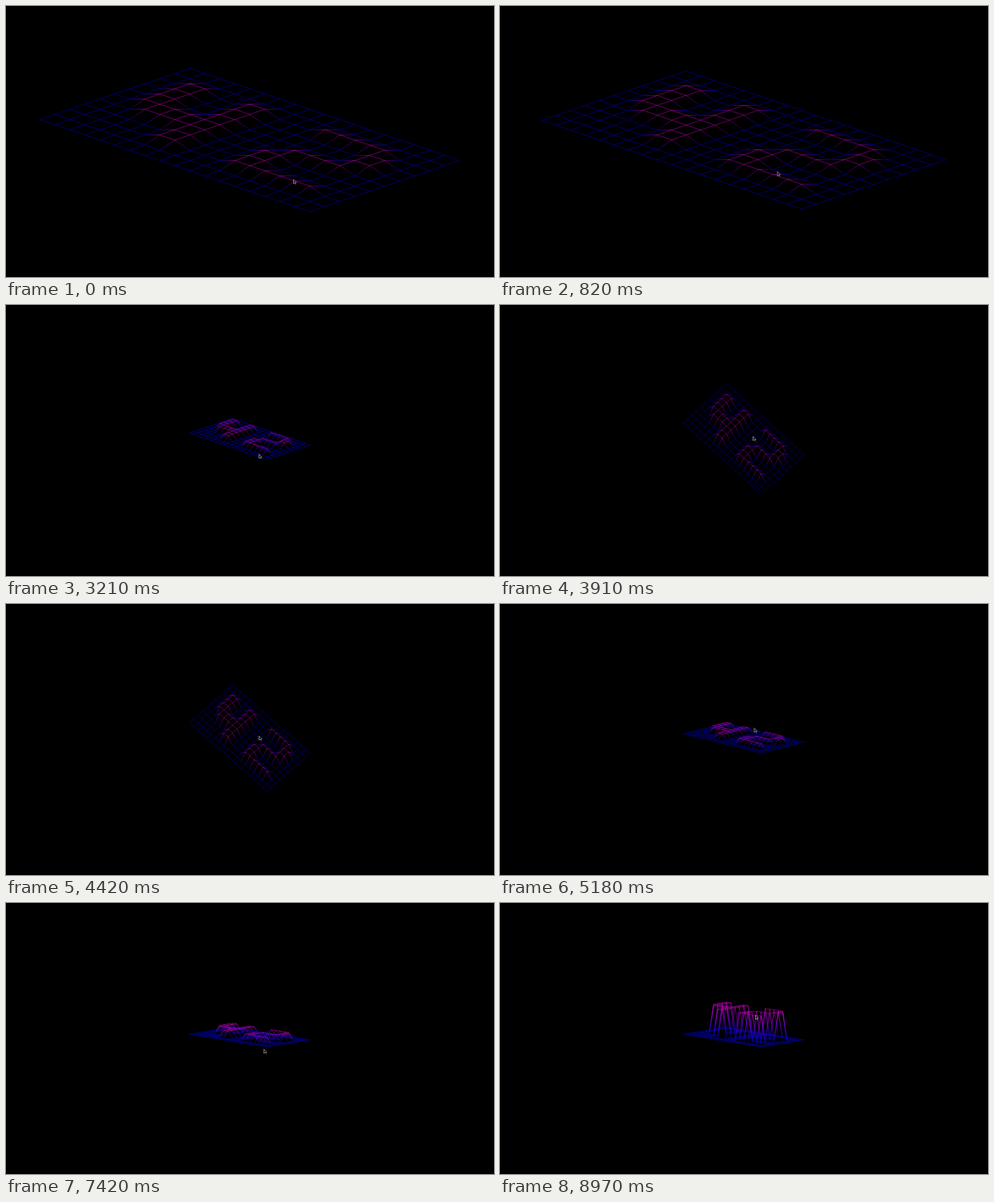
Recreate the animation shown at these times as an HTML page with a canvas. Size 595 by 331 pixels, loop 9000 ms.

```html
<!DOCTYPE html>
<html lang="en">
<head>
<meta charset="utf-8">
<title>Wireframe 42</title>
<style>
  html, body { margin: 0; width: 100%; height: 100%; overflow: hidden; background: #000; }
  canvas { display: block; }
</style>
</head>
<body>
<canvas id="stage" width="595" height="331"></canvas>
<script>
const ctx = document.getElementById('stage').getContext('2d');
const LOOP = 9000, STEP = 30;
const CENTER = { x: 297.3, y: 163.7 };
const LOW = 'rgb(0, 0, 215)', HIGH = 'rgb(215, 0, 205)';
const LINE = 0.46;

const MAP = [
  '...................',
  '...................',
  '..##..##...#####...',
  '..##..##.......##..',
  '..##..##.......##..',
  '..######....####...',
  '...#####...##......',
  '......##...##......',
  '......##...######..',
  '...................',
  '...................'
];
const COLS = MAP[0].length, ROWS = MAP.length;
const SPAN = COLS + ROWS - 2;

// The camera and pointer are sums of ramps (0 to 1) and arches (0 to 1 to 0).
function pose(t) {
  const progress = (from, to) => Math.min(1, Math.max(0, (t - from) / (to - from)));
  const ramp = progress;
  const arch = (from, to) => Math.sin(Math.PI * progress(from, to));
  const easeOut = (from, to, power) => 1 - (1 - progress(from, to)) ** power;

  return {
    half: 256 - 10 * ramp(180, 300) + 22 * ramp(500, 640)
      - 194.4 * easeOut(640, 2330, 1.108),
    tilt: 0.342 - 0.22 * arch(2360, 3210) + 0.8 * ramp(3210, 4165)
      - 0.937 * ramp(4165, 5060) + 0.365 * ramp(5060, 5940)
      - 0.405 * ramp(6000, 6790) + 0.42 * arch(6000, 6790),
    height: 6.2 - 5.9 * ramp(6000, 6790) + 3 * ramp(6910, 6970)
      + 30.7 * ramp(7210, 8970) ** 0.85,
    pointerX: 350.5 - 42 * ramp(180, 2330) + 6 * ramp(4420, 7420) - 3 * ramp(7420, 8970),
    pointerY: 212 - 32.8 * ramp(180, 2330) + 3 * ramp(2330, 3210)
      + 21 * arch(2360, 3210) - 23.5 * arch(3210, 5060)
      + 7.1 * ramp(5060, 5940) - 90 * arch(5060, 5940)
      - 10.8 * ramp(6000, 6790) - 41.5 * ramp(7420, 8970)
  };
}

const colorOf = p => p.raised ? HIGH : LOW;

function drawEdge(a, b) {
  const dx = Math.abs(b.x - a.x), dy = Math.abs(b.y - a.y);
  const fade = ctx.createLinearGradient(a.x, a.y, b.x, b.y);
  fade.addColorStop(0, colorOf(a));
  fade.addColorStop(1, colorOf(b));
  ctx.strokeStyle = fade;
  // Pixel-stepped lines get thinner towards the diagonal.
  ctx.lineWidth = LINE * Math.max(dx, dy) / Math.hypot(dx, dy);
  ctx.beginPath();
  ctx.moveTo(a.x, a.y);
  ctx.lineTo(b.x, b.y);
  ctx.stroke();
}

function drawGrid({ half, tilt, height }) {
  const tile = 2 * half / SPAN;
  const project = (col, row) => {
    const raised = MAP[row][col] === '#';
    return {
      raised,
      x: CENTER.x + (col - row - (COLS - ROWS) / 2) * tile,
      y: CENTER.y + (col + row - SPAN / 2) * tile * tilt - (raised ? height : 0)
    };
  };
  for (let row = 0; row < ROWS; row++) {
    for (let col = 0; col < COLS; col++) {
      const p = project(col, row);
      if (col + 1 < COLS) drawEdge(p, project(col + 1, row));
      if (row + 1 < ROWS) drawEdge(p, project(col, row + 1));
    }
  }
}

function drawPointer({ pointerX, pointerY }) {
  ctx.save();
  ctx.translate(pointerX, pointerY);
  ctx.fillStyle = '#000';
  ctx.strokeStyle = '#ccc';
  ctx.lineWidth = 0.55;
  ctx.stroke(new Path2D('M1.9 4 L2.7 6'));
  const arrow = new Path2D('M0 0 V5 L1.4 4 L3.6 3.7 Z');
  ctx.fill(arrow);
  ctx.stroke(arrow);
  ctx.restore();
}

function frame(now) {
  const state = pose(Math.floor((now % LOOP) / STEP) * STEP);
  ctx.fillStyle = '#000';
  ctx.fillRect(0, 0, 595, 331);
  drawGrid(state);
  drawPointer(state);
  requestAnimationFrame(frame);
}
requestAnimationFrame(frame);
</script>
</body>
</html>
```
